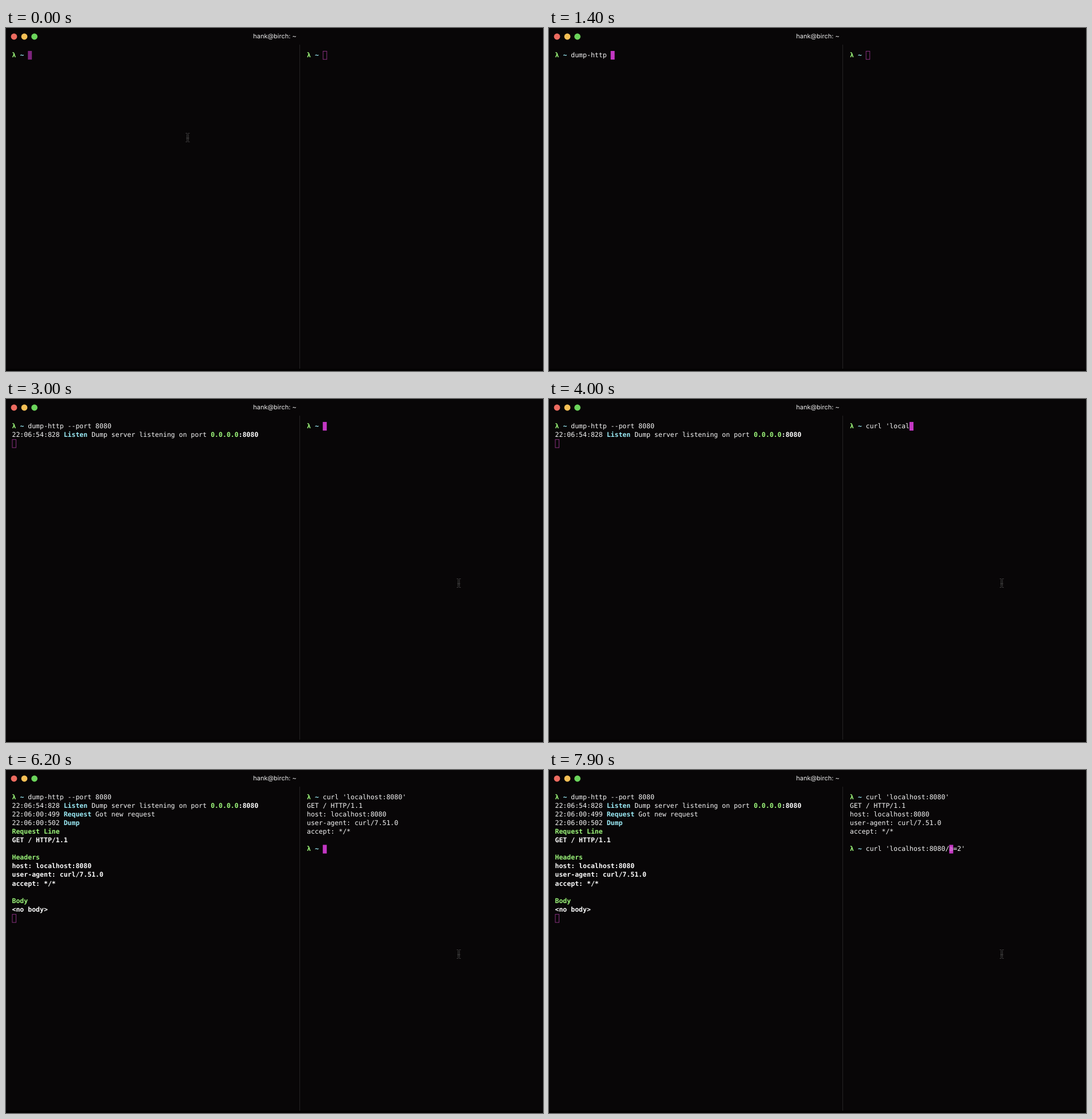
Recreate the animation shown at these times as an HTML page. Size 937 by 598 pixels, loop 8 s.

```html
<!DOCTYPE html>
<html lang="en">
<head>
<meta charset="utf-8">
<title>Terminal</title>
<style>
  html, body { margin: 0; width: 100%; height: 100%; overflow: hidden; background: #080607; }
  svg { display: block; }
  text { white-space: pre; text-rendering: geometricPrecision; fill: #f6f6f6; }
  .term { font: 11.52px "DejaVu Sans Mono", monospace; }
  .title { font: 11px Inter, sans-serif; text-anchor: middle; fill: #ececec; }
  .g, .c, .w { font-weight: bold; }
  .g { fill: #9cf67a; }
  .c { fill: #9bebf6; }
  .w { fill: #fff; }
  .under { fill: #e08ee0; }
</style>
</head>
<body>
<svg width="937" height="598">
  <rect y="594" width="937" height="4" fill="#030202"/>
  <rect x="512" y="29" width="1" height="565" fill="#252324"/>
  <circle cx="14" cy="15" r="5.4" fill="#ec6b60"/>
  <circle cx="32" cy="15" r="5.4" fill="#f5bf55"/>
  <circle cx="49.6" cy="15" r="5.4" fill="#6bd45b"/>
  <text class="title" x="469" y="17.8">hank@birch: ~</text>
  <g id="left" class="term"></g>
  <g id="right" class="term"></g>
  <g id="mouse" fill="none">
    <path d="M-3.5-7.5H-1L0-6.5L1-7.5H3.5M-3.5 7.5H-1L0 6.5L1 7.5H3.5M-1.2-6V6M1.2-6V6M-2.5 1H2.5" stroke="#4a4849" stroke-width=".9"/>
  </g>
</svg>
<script>
const LOOP = 8000, CW = 6.935, LH = 15.08, TOP = 40;
const $ = id => document.getElementById(id);
const tag = (cls, s) => `<tspan class="${cls}">${s}</tspan>`;
const g = s => tag("g", s), c = s => tag("c", s), w = s => tag("w", s);
const PROMPT = g("λ") + " " + c("~") + " ";

const SERVE = "dump-http --port 8080", CURL = "curl 'localhost:8080'";
const LISTEN = `22:06:54:828 ${c("Listen")} Dump server listening on port ${g("0.0.0.0")}${w(":8080")}`;
const REQUEST = ["GET / HTTP/1.1", "host: localhost:8080", "user-agent: curl/7.51.0", "accept: */*"];
const DUMP = [
  `22:06:00:499 ${c("Request")} Got new request`,
  `22:06:00:502 ${c("Dump")}`,
  g("Request Line"), w(REQUEST[0]), "",
  g("Headers"), ...REQUEST.slice(1).map(w), "",
  g("Body"), w("&lt;no body&gt;")
];

// [time, characters typed]
const SERVE_KEYS = [[600, 1], [700, 2], [800, 3], [900, 4], [1000, 5], [1100, 6], [1200, 8], [1400, 10],
  [1500, 11], [1600, 12], [1700, 13], [1800, 15], [1900, 16], [2000, 17], [2100, 19], [2200, 20], [2300, 21]];
// [time, path text before the closing quote, cursor column]
const EDITS = [[6300, "", 21], [6400, "", 20], [6700, "/", 21], [7200, "/a", 22], [7400, "/a=", 23],
  [7600, "/a=2", 24], [7700, "/a=2", 23], [7800, "/a=2", 22], [7900, "/a=2", 21]];
const MOUSE = [[0, 317, 191], [2700, 480, 238], [2800, 690, 296], [2900, 794, 321], [3000, 790, 321]];
const at = (list, t) => list.filter(e => e[0] <= t).pop();

function pane(id, x, lines, row, col, focused, glow = 1) {
  const cx = x + col * CW, cy = TOP + row * LH;
  const cursor = focused
    ? `<rect x="${cx}" y="${cy}" width="${CW}" height="${LH}" fill="#c337c3" opacity="${glow}"/>`
    : `<rect x="${cx + .5}" y="${cy + .5}" width="6.5" height="14.2" fill="none" stroke="#87307f"/>`;
  $(id).innerHTML = cursor + lines.map((s, i) =>
    `<text x="${x}" y="${TOP + 10.75 + i * LH}">${s}</text>`).join("");
}

function draw(t) {
  const rightFocus = t >= 2900;

  const n = (at(SERVE_KEYS, t) || [0, 0])[1];
  const left = [PROMPT + SERVE.slice(0, n)];
  if (t >= 2600) left.push(LISTEN);
  if (t >= 5400) left.push(...DUMP);
  const glow = t < 100 ? .62 : t < 200 ? .82 : 1;
  if (t < 2400) pane("left", 10.5, left, 0, 4 + n, true, glow);
  else pane("left", 10.5, left, t < 2600 ? 1 : left.length, 0, !rightFocus);

  const m = t < 3200 ? 0 : Math.min(CURL.length, Math.ceil(1 + (t - 3200) / 85));
  const right = [PROMPT + CURL.slice(0, m)];
  let row = 0, col = 4 + m;
  if (t >= 5200) row = 1, col = 0;
  if (t >= 5500) {
    let cmd = "";
    row = 6;
    col = 4;
    const edit = at(EDITS, t);
    if (edit) {
      const s = CURL.slice(0, -1) + edit[1] + "'", k = edit[2];
      cmd = s.slice(0, k) + tag("under", s.slice(k, k + 1)) + s.slice(k + 1);
      col += k;
    }
    right.push(...REQUEST, "", PROMPT + cmd);
  }
  pane("right", 525, right, row, col, rightFocus);

  const [, mx, my] = at(MOUSE, t);
  $("mouse").setAttribute("transform", `translate(${mx} ${my})`);
  $("mouse").style.display = t >= 600 && t < 2600 ? "none" : "";
}

const start = performance.now();
let last = -1;
function tick() {
  const t = Math.floor((performance.now() - start) % LOOP / 100) * 100;
  if (t !== last) draw(last = t);
  requestAnimationFrame(tick);
}
tick();
</script>
</body>
</html>
```
